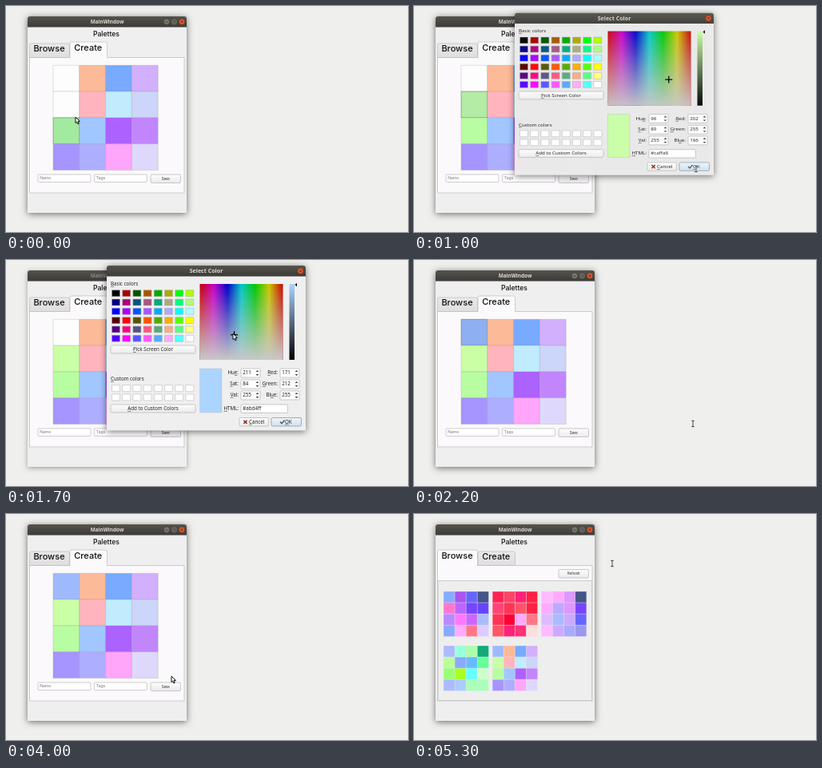
These frames come from a looping animation (503x283 px, 5400 ms). An HTML page with a canvas:

```html
<!DOCTYPE html>
<html lang="en">
<head>
<meta charset="utf-8">
<title>Palettes</title>
<style>
html, body { margin: 0; width: 100%; height: 100%; overflow: hidden; background: #efefed; }
canvas { display: block; width: 503px; height: 283px; }
</style>
</head>
<body>
<canvas id="stage"></canvas>
<script>
const W = 503, H = 283, LOOP = 5400, STEP = 100;
const canvas = document.getElementById('stage'), g = canvas.getContext('2d');
const dpr = window.devicePixelRatio || 1;
canvas.width = W * dpr;
canvas.height = H * dpr;

const UI = '"Noto Sans", sans-serif', ROUND = 'Inter, sans-serif';
const GREEN = { h: 96, s: 89 }, SKY = { h: 211, s: 84 }, BLUE = { h: 224, s: 96 };

const swatches = ('#fefdfe #fdba98 #78aaff #d2b0fd #fefdfe #ffb4be #c0ecfe #ccd5fa ' +
  '#b8fda2 #a2c6ff #ac62ff #c286fc #a694ff #aeaeff #ffa5fa #dfd8fd').split(' ');
const saved = [
  '8af a5e 66f 458 f7c b6f 74f 64f b8f f7f c6f abf 8af faf f78 dcf',
  'f25 f46 f27 f24 f47 f35 f56 f24 f35 f03 faf f78 f56 f27 f37 fdd',
  'fbf faf d9f 458 faf baf d9f 74f dbf abf caf 66f fbf caf aaf 99e',
  'abf 9fd afa 1a7 bf9 8af 6bf 6f9 9f7 af2 6ff cfc abf acf afb afb'
].map(row => row.split(' ').map(c => '#' + c));

// [step, x, y] of the pointer hot spot
const pointer = [[0, 87, 139], [1, 84, 127], [2, 92, 124], [4, 317, 93], [5, 318, 93], [8, 350, 198],
  [9, 353, 204], [11, 353, 204], [13, 80, 95], [15, 82, 96], [16, 225, 94], [17, 284, 92], [18, 281, 89],
  [20, 348, 203], [22, 349, 205], [23, 310, 206], [24, 222, 209], [26, 80, 212], [30, 80, 212],
  [31, 150, 212], [36, 150, 212], [38, 204, 206], [40, 207, 203], [42, 130, 18], [44, 58, 52],
  [45, 58, 53], [48, 196, 75], [49, 200, 74], [51, 214, 16], [53, 248, 62]];

function pointerAt(step) {
  let i = pointer.findIndex(k => k[0] >= step);
  if (i < 1) i = 1;
  const [a, ax, ay] = pointer[i - 1], [b, bx, by] = pointer[i];
  const p = (step - a) / (b - a);
  return [ax + (bx - ax) * p, ay + (by - ay) * p];
}

function rgb(pick) {
  if (!pick) return [255, 255, 255];
  const channel = n => {
    const k = (n + pick.h / 60) % 6;
    return Math.round(255 - pick.s * Math.max(0, Math.min(k, 4 - k, 1)));
  };
  return [5, 3, 1].map(channel);
}
const hex = pick => '#' + rgb(pick).map(v => v.toString(16).padStart(2, '0')).join('');

function rect(x, y, w, h, fill, stroke, radius = 0, line = 0.7) {
  g.beginPath();
  g.roundRect(x, y, w, h, radius);
  if (fill) { g.fillStyle = fill; g.fill(); }
  if (stroke) { g.strokeStyle = stroke; g.lineWidth = line; g.stroke(); }
}

function path(points, stroke, line = 0.8, fill) {
  g.beginPath();
  points.forEach(([x, y]) => g.lineTo(x, y));
  if (fill) { g.closePath(); g.fillStyle = fill; g.fill(); }
  if (stroke) { g.strokeStyle = stroke; g.lineWidth = line; g.stroke(); }
}

// "&" marks the underlined letter; align is 0 left, 0.5 centre, 1 right
function text(label, x, y, size, { align = 0, color = '#222', weight = 400, font = UI } = {}) {
  const mark = label.indexOf('&'), plain = label.replace('&', '');
  g.font = `${weight} ${size}px ${font}`;
  g.textBaseline = 'middle';
  g.fillStyle = color;
  x -= g.measureText(plain).width * align;
  g.fillText(plain, x, y);
  if (mark >= 0) {
    const before = g.measureText(plain.slice(0, mark)).width;
    g.fillRect(x + before, y + size * 0.48, g.measureText(plain[mark]).width, 0.5);
  }
}

function vertical(y, h, ...colors) {
  const fill = g.createLinearGradient(0, y, 0, y + h);
  colors.forEach((c, i) => fill.addColorStop(i / (colors.length - 1), c));
  return fill;
}

function button(x, y, w, h, label, size, font, primary) {
  const fill = primary ? vertical(y, h, '#eef4fa', '#d3e0ec') : vertical(y, h, '#fdfdfd', '#ebebeb');
  rect(x, y, w, h, fill, primary ? '#6f93b5' : '#b4b4b4', 1.5);
  text(label, x + w / 2 + (primary ? 1 : 0), y + h / 2, size, { align: 0.5, font });
}

function frame(x, y, w, h, title, size, active) {
  g.save();
  g.shadowColor = `rgba(0,0,0,${active ? 0.55 : 0.35})`;
  g.shadowBlur = (active ? 9 : 6) * dpr;
  g.shadowOffsetY = 1.5 * dpr;
  rect(x, y, w, h, '#efefef', null, [3, 3, 0, 0]);
  g.restore();
  rect(x, y, w, 13.5, vertical(y, 13.5, '#55534c', '#3c3b37'), null, [3, 3, 0, 0]);
  text(title, x + w / 2, y + 6.8, size, { align: 0.5, weight: 700, color: active ? '#dfdbd2' : '#8a877f' });
}

function titleButton(x, y, kind, color) {
  g.beginPath();
  g.arc(x, y, 3.7, 0, 7);
  g.fillStyle = color;
  g.fill();
  g.strokeStyle = '#33322e';
  g.lineWidth = 0.5;
  g.stroke();
  if (kind === 'min') path([[x - 1.6, y + 0.3], [x + 1.6, y + 0.3]], '#33322e');
  if (kind === 'max') rect(x - 1.5, y - 1.5, 3, 3, null, '#33322e');
  if (kind === 'close') cross(x, y, 1.4, '#4a2010', 0.8);
}

function cross(x, y, r, color, line) {
  path([[x - r, y - r], [x + r, y + r]], color, line);
  path([[x + r, y - r], [x - r, y + r]], color, line);
}

function palette(colors, x, y, size, line, focus = -1) {
  colors.forEach((color, i) => {
    const cx = x + i % 4 * size, cy = y + (i >> 2) * size;
    rect(cx, cy, size, size, color, line, 0, 0.5);
    if (i === focus) rect(cx, cy, size, size, 'rgba(30,110,150,.13)', 'rgba(60,80,90,.5)', 0, 0.6);
  });
}

function tab(x, w, label, active) {
  const y = active ? 45 : 47;
  rect(x, y, w, 64.5 - y, active ? '#fbfafb' : vertical(y, 17, '#e9e9e9', '#dedede'), '#bcbcbc', [2, 2, 0, 0]);
  if (active) rect(x + 0.4, 63.5, w - 0.8, 2, '#fbfafb');
  text(label, x + w / 2 - 0.5, active ? 53 : 54, 11, { align: 0.5, weight: 500, font: ROUND, color: '#111' });
}

function field(x, hint, value, focused) {
  rect(x, 211, 66, 9.5, '#fff', focused ? '#8fb0d2' : '#b9b9b9', 1);
  text(value || hint, x + 2.3, 215.8, 5, { font: ROUND, color: value ? '#222' : '#777' });
  if (focused) rect(x + 2.3 + (value ? g.measureText(value).width : 0), 213, 0.5, 5.6, '#222');
}

function mainWindow(step, active) {
  const browsing = step >= 45, cells = swatches.slice();
  if (step >= 10) cells[4] = hex(GREEN);
  if (step >= 21) cells[0] = hex(BLUE);

  frame(27, 13, 199, 246, 'MainWindow', 6.4, active);
  ['min', 'max', 'close'].forEach((kind, i) =>
    titleButton(201 + i * 9.5, 19.7, kind, i < 2 ? '#7c796f' : '#e9582c'));
  text('Palettes', 125.5, 35, 8.6, { align: 0.5, weight: 500, font: ROUND, color: '#111' });
  rect(29.5, 64.5, 193.5, 169.5, '#fbf9fb', '#bcbcbc');
  tab(29.5, 50, 'Browse', browsing);
  tab(80, 46.5, 'Create', !browsing);

  if (browsing) {
    button(181, 69.5, 37.5, 10.5, 'Refresh', 4.2, ROUND);
    rect(30, 83.5, 192.5, 150, '#eeeeee', '#bcbcbc');
    const shown = step >= 50 ? [...saved, cells] : saved;
    shown.forEach((colors, i) =>
      palette(colors, 37 + i % 3 * 61.2, i < 3 ? 97 : 165, 14.1, 'rgba(235,225,235,.6)'));
    return;
  }
  let focus = -1;
  if (step < 1) focus = 8;
  else if (active && step < 14) focus = 4;
  else if (active && step < 26) focus = 0;
  palette(cells, 59, 74.3, 32.8, 'rgba(150,140,135,.5)', focus);

  const typing = step >= 26 && step < 39;
  const name = typing ? 'Pastel'.slice(0, Math.max(0, step - 26) * 2) : '';
  const tags = typing ? 'pastel, blue, soft'.slice(0, Math.max(0, step - 31) * 4) : '';
  field(40, 'Name', name, typing && step < 31);
  field(110.5, 'Tags', tags, typing && step >= 31);
  button(181, 211, 37.5, 10.5, 'Save', 4.4, ROUND);
}

function spin(label, value, x, y) {
  text(label, x - 3, y + 5.5, 6.2, { align: 1 });
  rect(x, y, 24, 11, '#fff', '#b4b4b4', 1);
  text(String(value), x + 2.2, y + 5.5, 6.2);
  path([[x + 18.5, y + 4], [x + 20.5, y + 2], [x + 22.5, y + 4]], null, 0, '#444');
  path([[x + 18.5, y + 7], [x + 20.5, y + 9], [x + 22.5, y + 7]], null, 0, '#444');
}

function spectrum(pick) {
  const x = 242.5, y = 30, w = 104, h = 95;
  const hues = g.createLinearGradient(x, 0, x + w, 0);
  for (let i = 0; i <= 6; i++) hues.addColorStop(i / 6, `hsl(${360 - i * 60},100%,39.2%)`);
  rect(x, y, w, h, hues);
  rect(x, y, w, h, vertical(y, h, 'rgba(200,200,200,0)', 'rgb(200,200,200)'));
  g.save();
  g.beginPath();
  g.rect(x, y, w + 0.5, h + 0.5);
  g.clip();
  const px = pick ? x + (360 - pick.h) / 360 * w : x + w;
  const py = pick ? y + (1 - pick.s / 255) * h : y + h;
  path([[px - 4.5, py], [px + 4.5, py]], '#000', 1.3);
  path([[px, py - 4.5], [px, py + 4.5]], '#000', 1.3);
  g.restore();
  rect(354.5, y, 6.5, h, vertical(y, h, hex(pick), '#000'));
  path([[361.5, 31], [364, 28.7], [364, 33.3]], null, 0, '#000');
}

function dialog(pick) {
  frame(126, 7, 249, 206.5, 'Select Color', 7.1, true);
  titleButton(368.5, 13.7, 'close', '#e9582c');
  text('&Basic colors', 131, 30, 6.2);
  for (let i = 0; i < 48; i++) {
    const r = (i / 3 | 0) % 4 * 85, green = (i / 12 | 0) * 85, b = i % 3 * 127.5;
    const x = 132.5 + (i / 6 | 0) * 13.2, y = 37.7 + i % 6 * 11.3;
    rect(x, y, 10, 8, `rgb(${r},${green},${b})`, '#a8a8a8', 0, 0.5);
    if (i === 47 && !pick) rect(x - 0.8, y - 0.8, 11.6, 9.6, null, '#777', 0, 0.5);
  }
  button(131, 107, 106, 10, '&Pick Screen Color', 6.2);
  text('&Custom colors', 131, 149.5, 6.2);
  for (let i = 0; i < 16; i++)
    rect(132.5 + i % 8 * 13.2, 156.7 + (i >> 3) * 11.3, 10, 8, '#fff', '#bbb', 0, 0.6);
  button(131, 181, 106, 10, '&Add to Custom Colors', 6.2);

  spectrum(pick);
  rect(242.5, 136, 27.5, 55, pick ? hex(pick) : '#fbfbfb', '#c0c0c0', 0, 0.5);
  const [r, green, b] = rgb(pick);
  [['Hu&e:', pick ? pick.h : 0, '&Red:', r], ['&Sat:', pick ? pick.s : 0, '&Green:', green],
    ['&Val:', 255, 'Bl&ue:', b]].forEach(([left, a, right, c], i) => {
    spin(left, a, 294, 136 + i * 14);
    spin(right, c, 343, 136 + i * 14);
  });
  text('&HTML:', 291, 186, 6.2, { align: 1 });
  rect(294, 181, 58.5, 10.5, '#fff', '#b4b4b4', 1);
  text(hex(pick), 296.3, 186, 6.2);

  button(292, 197.5, 36.5, 10.5, '', 6.2);
  cross(299.5, 202.8, 2.1, '#8c2f24', 1.5);
  text('&Cancel', 304, 202.8, 6.2);
  button(332, 197.5, 37.5, 10.5, '', 6.2, UI, true);
  path([[343, 202.5], [345, 204.8], [348.5, 200.5]], '#3b5a3a', 1.3);
  text('&OK', 349, 202.8, 6.2);
}

function drawPointer(x, y, beam) {
  if (beam) {
    for (const [color, line] of [['#fff', 2], ['#222', 0.9]]) {
      path([[x, y - 3.5], [x, y + 3.5]], color, line);
      path([[x - 1.8, y - 3.7], [x + 1.8, y - 3.7]], color, line);
      path([[x - 1.8, y + 3.7], [x + 1.8, y + 3.7]], color, line);
    }
    return;
  }
  const arrow = [[0, 0], [0, 7.6], [1.7, 6.1], [2.9, 8.9], [4.2, 8.3], [3, 5.6], [5.4, 5.5], [0, 0]];
  path(arrow.map(([dx, dy]) => [x + dx, y + dy]), '#111', 1, '#fff');
}

function draw(step) {
  g.setTransform(dpr, 0, 0, dpr, 0, 0);
  rect(0, 0, W, H, '#efefed');
  const open = step >= 2 && step <= 10 || step >= 15 && step <= 21;
  const opening = step === 2 || step === 15, closing = step === 10 || step === 21;
  mainWindow(step, !open || closing);

  if (open) {
    let pick = null;
    if (step >= 18) pick = BLUE;
    else if (step === 17) pick = SKY;
    else if (step >= 5 && step < 15) pick = GREEN;
    const scale = opening ? 0.97 : closing ? 0.982 : 1;
    g.save();
    g.globalAlpha = opening ? 0.75 : closing ? 0.96 : 1;
    g.translate(250.5, 110);
    g.scale(opening ? scale : 1, scale);
    g.translate(-250.5, -110);
    dialog(pick);
    g.restore();
  }
  const [x, y] = pointerAt(step);
  const inField = step < 45 && x > 38 && x < 177 && y > 208 && y < 222;
  drawPointer(x, y, (!open || closing) && (x > 227 || inField));
}

const start = performance.now();
function tick() {
  draw(Math.floor((performance.now() - start) % LOOP / STEP));
  requestAnimationFrame(tick);
}
tick();
</script>
</body>
</html>
```
